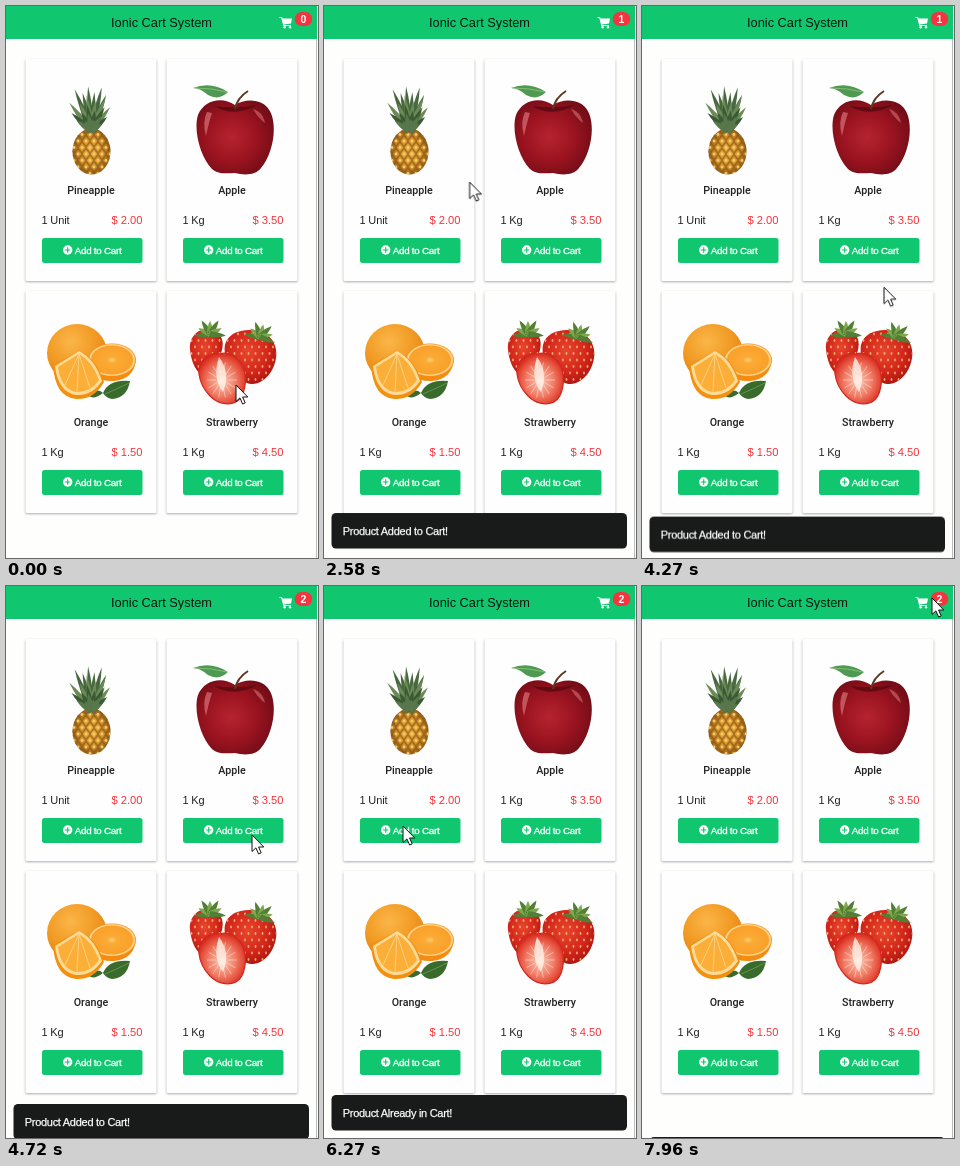
These frames come from a looping animation (312x552 px, 8000 ms). An HTML page:

```html
<!DOCTYPE html>
<html lang="en">
<head>
<meta charset="utf-8">
<title>Cart</title>
<style>
  html, body { margin: 0; width: 100%; height: 100%; overflow: hidden; background: #fefefc; }
  svg { display: block; width: 312px; height: 552px; overflow: hidden; }
  text { font-family: "Liberation Sans", Arial, sans-serif; }
  .title { font-size: 12.8px; fill: #06180e; }
  .name { font: 500 10.7px Roboto, sans-serif; fill: #222; }
  .unit { font-size: 11px; letter-spacing: -.15px; fill: #222; }
  .price { font-size: 11.2px; fill: #f5333b; }
  .add { font-size: 9.8px; letter-spacing: -.25px; fill: #fff; stroke: #fff; stroke-width: .3px; }
  .count { font-size: 10.5px; font-weight: bold; fill: #fff; }
  .toast text { font-size: 11px; letter-spacing: -.28px; fill: #fff; stroke: #fff; stroke-width: .25px; }
  .card { fill: #fefefe; filter: drop-shadow(0 1px 1px rgba(50, 55, 90, .42)); }
</style>
</head>
<body>
<svg id="stage" viewBox="0 0 312 552"></svg>
<script>
const LOOP = 8000;
const GREEN = '#10c76f';
const stage = document.getElementById('stage');
const range = (n, fn) => Array.from({ length: n }, (_, i) => fn(i)).join('');

const gradient = (id, stops, extra = '') =>
  `<radialGradient id="${id}" ${extra}>${stops.map(([at, color]) =>
    `<stop offset="${at}" stop-color="${color}"/>`).join('')}</radialGradient>`;

const defs = `<defs>
  ${gradient('gold', [[0, '#efb544'], [.6, '#d9982c'], [1, '#9a6418']])}
  ${gradient('red', [[0, '#b52430'], [.5, '#9c1420'], [1, '#6e0c16']], 'cx=".45" cy=".5" r=".62"')}
  ${gradient('peel', [[0, '#fbb648'], [.55, '#f19a24'], [1, '#e07c10']], 'cx=".4" cy=".3" r=".75"')}
  ${gradient('pulp', [[0, '#ffcf78'], [.2, '#fbab35'], [.85, '#f9a02a'], [.92, '#ffdc9c'], [1, '#f48f14']])}
  ${gradient('berry', [[0, '#e8452f'], [.6, '#d3261d'], [1, '#a81412']], 'cx=".45" cy=".4" r=".65"')}
  ${gradient('flesh', [[0, '#fdeee2'], [.25, '#f6a48f'], [.5, '#f2826c'], [.8, '#e5503c'], [1, '#d62a1e']], 'cx=".5" cy=".55" r=".55"')}
  <clipPath id="barrel"><ellipse id="barrelShape" cx="85.5" cy="145.5" rx="19" ry="23"/></clipPath>
  <clipPath id="berryLeft"><path id="leftShape" d="M184 343C183 331 192 322 203 323C213 324 219 333 216 344C213 355 205 369 199 369C191 369 185 356 184 343Z"/></clipPath>
  <clipPath id="berryRight"><path id="rightShape" d="M219 339C222 326 238 322 252 325C265 328 272 339 270 352C268 367 256 379 245 378C230 376 216 354 219 339Z"/></clipPath>
</defs>`;

// A pointed leaf growing from (x, y) at an angle from vertical.
const blade = (x, y, angle, length, width, color) =>
  `<path d="M${-width} 0Q${-width} ${-length * .6} 0 ${-length}Q${width} ${-length * .6} ${width} 0Z"
    fill="${color}" transform="translate(${x} ${y}) rotate(${angle})"/>`;

const pineapple = () => {
  const crown = [[45, 22, '#48683f'], [36, 38, '#6c8a55'], [27, 48, '#3a5a35'], [18, 55, '#58774a']]
    .map(([length, spread, color]) => range(6, i =>
      blade(85.5, 125, spread * (i / 2.5 - 1), length - (i % 2) * 6, 3.2, color))).join('');
  const scales = range(8, r => range(6, c => {
    const x = 64 + c * 8 + (r % 2) * 4, y = 122 + r * 6.5;
    return `<path d="M${x - 4} ${y}L${x} ${y - 5}L${x + 4} ${y}L${x} ${y + 5}Z" fill="none"
      stroke="#8a5416" stroke-width="1.1" opacity=".6"/><circle cx="${x}" cy="${y}" r="1.4" fill="#f3cb68"/>`;
  }));
  return `<use href="#barrelShape" fill="url(#gold)"/><g clip-path="url(#barrel)">${scales}</g>${crown}`;
};

const apple = () => `
  <path d="M229 99C216 90 198 94 192 109C187 125 195 152 206 163C213 169 222 167 229 167C237 169 249 170 255 162C265 150 271 127 266 110C261 93 241 91 229 99Z" fill="url(#red)"/>
  <path d="M208 100Q228 112 251 99Q231 103 208 100Z" fill="#56070f" opacity=".75"/>
  <path d="M201 106Q196 116 200 130Q203 116 206 107Z" fill="#e58085" opacity=".6"/>
  <path d="M247 103Q257 106 259 117Q251 111 247 103Z" fill="#e58085" opacity=".5"/>
  <path d="M229 103Q231 92 242 85" fill="none" stroke="#5d3923" stroke-width="2"/>
  <path d="M187 82Q205 75 222 86Q213 95 202 89Q194 82 187 82Z" fill="#4f9a52"/>
  <path d="M188 82Q206 82 221 86" fill="none" stroke="#9ac985" stroke-width=".7"/>`;

const orange = () => `
  <path d="M97 387Q90 381 83 390Q88 394 97 387Q103 373 124 375Q121 392 106 393Q100 392 97 387Z" fill="#386b2c"/>
  <path d="M99 388Q111 383 123 377" stroke="#78a45a" stroke-width=".7" fill="none"/>
  <ellipse cx="71" cy="347" rx="30" ry="29" fill="url(#peel)"/>
  <path d="M82 354Q83 376 108 375Q129 373 130 352Z" fill="#f38c10"/>
  <ellipse cx="106" cy="354" rx="24" ry="16.5" fill="url(#pulp)"/>
  <path d="M47 359L73 345Q90 352 98 376Q88 394 70 393Q49 391 47 359Z" fill="#f4900f"/>
  <path d="M49 360L73 345Q89 353 96 375Q86 390 70 389Q52 386 49 360Z" fill="#ffdb98"/>
  <path d="M52 361L73 348Q86 355 93 374Q84 387 70 386Q55 383 52 361Z" fill="#fbae38"/>
  <path d="M73 348L59 379M73 348L71 386M73 348L84 382" stroke="#ffd48a" stroke-width=".9" fill="none"/>`;

const seeds = (x, y) => range(9, r => range(9, c =>
  `<ellipse cx="${x + c * 7 + (r % 2) * 3.5}" cy="${y + r * 6.5}" rx=".9" ry="1.4" fill="#f0b060"/>`));

const strawberry = () => {
  const rays = range(14, i => {
    const a = i * Math.PI / 7, dx = Math.cos(a), dy = Math.sin(a);
    return `<path d="M${216 + 6 * dx} ${374 + 7 * dy}L${216 + 15 * dx} ${374 + 18 * dy}" stroke="#fbe0d4" stroke-width=".9" opacity=".65"/>`;
  });
  const tuft = (x, y, tilt) => range(7, i =>
    blade(x, y, tilt + (i - 3) * 32, 16 - (i % 2) * 3, 3, i % 2 ? '#7fa84c' : '#527f35'));
  return `<use href="#leftShape" fill="url(#berry)"/>
    <g clip-path="url(#berryLeft)">${seeds(182, 328)}</g>
    <use href="#rightShape" fill="url(#berry)"/>
    <g clip-path="url(#berryRight)">${seeds(218, 328)}</g>
    ${tuft(204, 328, 0)}${tuft(254, 331, 15)}
    <path d="M193 368C191 355 204 345 214 348C221 345 233 350 237 361C242 373 239 391 230 396C221 400 211 397 204 390C198 384 194 376 193 368Z" fill="url(#flesh)" stroke="#d3251f" stroke-width="1.2"/>
    ${rays}
    <path d="M213 351Q225 367 217 386Q206 372 213 351Z" fill="#fff0e6" opacity=".8"/>`;
};

const card = (x, y, name, unit, price) => `<g transform="translate(${x} ${y})">
  <rect class="card" x="19.5" y="53" width="131" height="222" rx="1.5"/>
  <text class="name" x="85" y="188" text-anchor="middle">${name}</text>
  <text class="unit" x="35.5" y="218">${unit}</text>
  <text class="price" x="136.5" y="218" text-anchor="end">${price}</text>
  <rect x="36" y="232" width="100.5" height="25" rx="2.5" fill="${GREEN}"/>
  <circle cx="61.7" cy="244" r="4.7" fill="#fff"/>
  <path d="M59 244h5.4M61.7 241.3v5.4" stroke="${GREEN}" stroke-width="1.2"/>
  <text class="add" x="68.7" y="248">Add to Cart</text></g>`;

const header = `<rect width="311" height="33" fill="${GREEN}"/>
  <text class="title" x="155.5" y="21" text-anchor="middle">Ionic Cart System</text>
  <g fill="#fff"><path d="M276 12.5H286L285 17.6L277.6 18.5Z"/>
    <path d="M273.5 11.5H275.7L277.8 19.5H285" fill="none" stroke="#fff" stroke-width="1.1"/>
    <circle cx="278.6" cy="21.3" r="1.2"/><circle cx="284" cy="21.3" r="1.2"/></g>
  <rect x="288.7" y="6" width="17.6" height="14" rx="7" fill="#f4343f"/>
  ${range(3, i => `<text class="count" x="297.5" y="16.7" text-anchor="middle">${i}</text>`)}`;

const toast = message => `<g class="toast">
  <rect x="7.5" y="509" width="295.5" height="35.5" rx="4.5" fill="#191a1a"/>
  <text x="18.7" y="531">${message}</text></g>`;

stage.innerHTML = `${defs}
  <rect width="312" height="552" fill="#fefefc"/>
  ${card(0, 0, 'Pineapple', '1 Unit', '$ 2.00')}
  ${card(141, 0, 'Apple', '1 Kg', '$ 3.50')}
  ${card(0, 232, 'Orange', '1 Kg', '$ 1.50')}
  ${card(141, 232, 'Strawberry', '1 Kg', '$ 4.50')}
  ${pineapple()}${apple()}${orange()}${strawberry()}
  <path d="M310.5 33V552" stroke="#b9bbbd"/>
  ${header}
  ${['Added to', 'Added to', 'Already in'].map(s => toast(`Product ${s} Cart!`)).join('')}
  <path id="cursor" d="M0 0V16.5L3.9 12.9L6.6 19L9.2 17.9L6.6 12H11.8Z" fill="#fff" stroke="#111" stroke-width="1" stroke-linejoin="round"/>`;

// Steps are [ms, properties, easing to the next step].
const play = (element, steps) => element.animate(
  steps.map(([ms, props, easing = 'linear']) => ({ offset: ms / LOOP, easing, ...props })),
  { duration: LOOP, iterations: Infinity });

const at = (x, y) => ({ transform: `translate(${x}px, ${y}px)` });
const SMOOTH = 'cubic-bezier(.4, .1, .5, 1)';
play(document.getElementById('cursor'), [
  [0, at(230, 379)], [1060, at(230, 379), SMOOTH],
  [1820, at(90, 241)], [2340, at(90, 241), SMOOTH],
  [3100, at(282, 17)], [3130, at(282, 17), 'ease-in'],
  [3550, at(228, 228), 'ease-out'], [3930, at(230, 378)],
  [3960, at(230, 378), SMOOTH], [4480, at(246, 249)],
  [4730, at(246, 249), SMOOTH], [5440, at(79, 240)],
  [6620, at(79, 240), 'ease-in'], [6930, at(253, 102), 'ease-out'],
  [7130, at(290, 12)], [LOOP, at(290, 12)]
]);

const CLICKS = [0, 2310, 4650, LOOP];
stage.querySelectorAll('.count').forEach((label, i) => {
  const shown = n => ({ opacity: n === i ? 1 : 0 });
  play(label, CLICKS.map((ms, n) => [ms, shown(Math.min(n, 2)), 'step-end']));
});

const ENTER = 'cubic-bezier(.155, 1.105, .295, 1.12)';
const LEAVE = 'cubic-bezier(.36, .66, .04, 1)';
const down = at(0, 43), up = at(0, 0);
// Enter, leave, leave duration, leave distance; the loop cuts the last one short.
const TOASTS = [[2310, 4265, 300, 43], [4650, 6220, 0, 43], [5790, 7755, 205, 42]];
stage.querySelectorAll('.toast').forEach((element, i) => {
  const [enter, leave, time, drop] = TOASTS[i];
  play(element, [[0, down], [enter, down, ENTER], [enter + 400, up],
    [leave, up, LEAVE], [leave + time, at(0, drop)], [LOOP, at(0, drop)]]);
});
</script>
</body>
</html>
```
